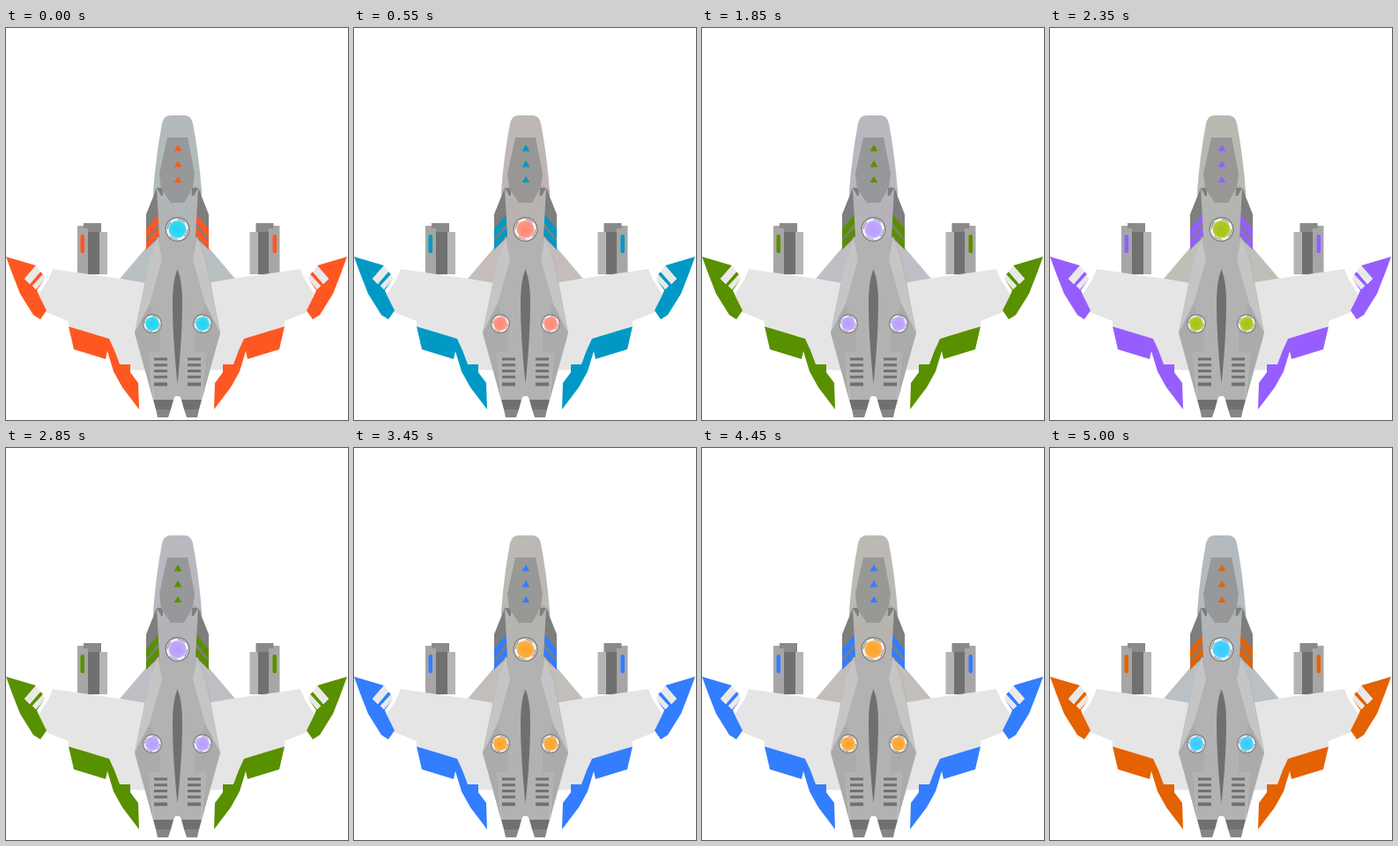
Animation of 388x444 px, one loop 5.05 s. Source, as an HTML page:

```html
<!DOCTYPE html>
<html lang="en">
<head>
<meta charset="utf-8">
<title>Starfighter</title>
<style>
  html, body { margin: 0; width: 100%; height: 100%; overflow: hidden; background: #fff; }
  svg { display: block; width: 100%; height: 100%; }
  .accent { fill: #ff5722; }
  .dark { fill: #707070; }
</style>
</head>
<body>
<svg id="ship" viewBox="0 0 388 444">
  <defs>
    <radialGradient id="glow">
      <stop offset="0" stop-color="#26d0f0"/>
      <stop offset="1" stop-color="#30def4"/>
    </radialGradient>
    <g id="wing">
      <path fill="#e5e5e5" d="M53 273L130 284L160 289L162 388L141 387L128 383L119 356L71 337V332L46 322L37 302L48 285Z"/>
      <g class="accent">
        <path d="M0 259L34 269L21 284L27 290L39 276L42 279L30 292L34 296L44 284L35 297L38 304L46 320L39 330L31 325L16 301L7 278Z"/>
        <path d="M71 338L117 352L123 365L129 381H141V390L150 402L151 432L132 407L122 389L115 366L113 375L77 364Z"/>
      </g>
      <path fill="#e9e9e9" d="M34 269L39 276L27 290L21 284ZM42 279L44 284L34 296L30 292Z"/>
    </g>
    <g id="pod">
      <path fill="#a6a6a6" d="M81 224H93V279H81Z"/>
      <path fill="#8a8a8a" d="M88 221H108V231H93V227H88Z"/>
      <path class="dark" d="M93 231H106V279H93Z"/>
      <path fill="#b5b5b5" d="M106 231H115V279H106Z"/>
      <rect class="accent" x="84.500" y="234" width="4.500" height="21" rx="2"/>
    </g>
    <g id="shoulder">
      <path fill="#7e7e7e" d="M171 181L159 211V251L178 233V181Z"/>
      <path class="accent" d="M159 228L174 210V220L159 239ZM159 242L175 224V233L159 251Z"/>
    </g>
    <path id="facet" fill="#c5c5c5" d="M172 237L177 262L163 312L162 367L168 421H167L146 345L163 262Z"/>
    <g id="exhaust" class="dark">
      <path d="M168 373.500h15v3h-15zM168 380.200h15v3h-15zM168 387h15v3h-15zM168 393.700h15v3h-15zM168 401.500h15v4h-15z"/>
      <path d="M167 421H190L187 432H170Z"/>
      <path fill="#858585" d="M170 432H187L184 441H172Z"/>
    </g>
    <g id="lens">
      <circle r="14" fill="#7b8082"/>
      <circle r="12.600" fill="#eef2f3"/>
      <circle r="11.200" fill="none" stroke="#8b989b" stroke-width="1.200" stroke-dasharray="9 8.600"/>
      <circle r="9.800" fill="url(#glow)"/>
    </g>
  </defs>

  <use href="#pod"/>
  <use href="#pod" transform="translate(391.500) scale(-1 1)"/>
  <path fill="#b9c0c2" d="M158 250L172 234H217L231 250L260 284L229 290H160L129 284Z"/>
  <use href="#wing"/>
  <use href="#wing" transform="translate(387) scale(-1 1)"/>

  <path fill="#b3babc" d="M177 108Q179 99 187 99H202Q210 99 212 108Q219 145 222 185L217 264H172L167 185Q170 145 177 108Z"/>
  <path fill="#a5a9aa" d="M214 178L222 185L217 264H194.500V198H203Z"/>
  <use href="#shoulder"/>
  <use href="#shoulder" transform="translate(389) scale(-1 1)"/>
  <path fill="#b0b5b7" d="M171 181L176 190H213L218 181L215 237H174Z"/>
  <path fill="#969899" d="M183 124H206L214 165L212 180L202 198H187L176 182L174 165Z"/>
  <path class="accent" d="M195 132l4.300 7.500h-8.600zM195 150l4.300 7.500h-8.600zM195 168l4.300 7h-8.600z"/>

  <path fill="#b2b2b2" d="M172 237H217L227 262L243 345L222 421H199L197 417H192L190 421H167L146 345L163 262Z"/>
  <use href="#facet"/>
  <use href="#facet" transform="translate(389) scale(-1 1)"/>
  <path fill="#ababab" d="M163 312L175 345V367H162L167 421L146 345Z"/>
  <path fill="#ababab" d="M226 312L214 345V367H227L222 421L243 345Z"/>
  <path fill="#6f6f6f" d="M194.500 273Q200 287 200 310Q200 350 194.500 403Q189 350 189 310Q189 287 194.500 273Z"/>
  <use href="#exhaust"/>
  <use href="#exhaust" transform="translate(389) scale(-1 1)"/>

  <use href="#lens" transform="translate(194.500 228)"/>
  <use href="#lens" transform="translate(166 335) scale(.78)"/>
  <use href="#lens" transform="translate(223 335) scale(.78)"/>
</svg>
<script>
  const LOOP = 5050, STEP = 50, TURN = 18, LEAD = 15;
  const ship = document.getElementById("ship");

  // Hue turns backwards once per second, in 50 ms steps.
  function draw(ms) {
    const step = Math.floor((ms % LOOP) / STEP);
    const angle = Math.min(0, LEAD - TURN * step);
    ship.style.filter = `hue-rotate(${angle}deg)`;
  }

  const start = performance.now();
  function tick() {
    draw(performance.now() - start);
    requestAnimationFrame(tick);
  }
  tick();
</script>
</body>
</html>
```
